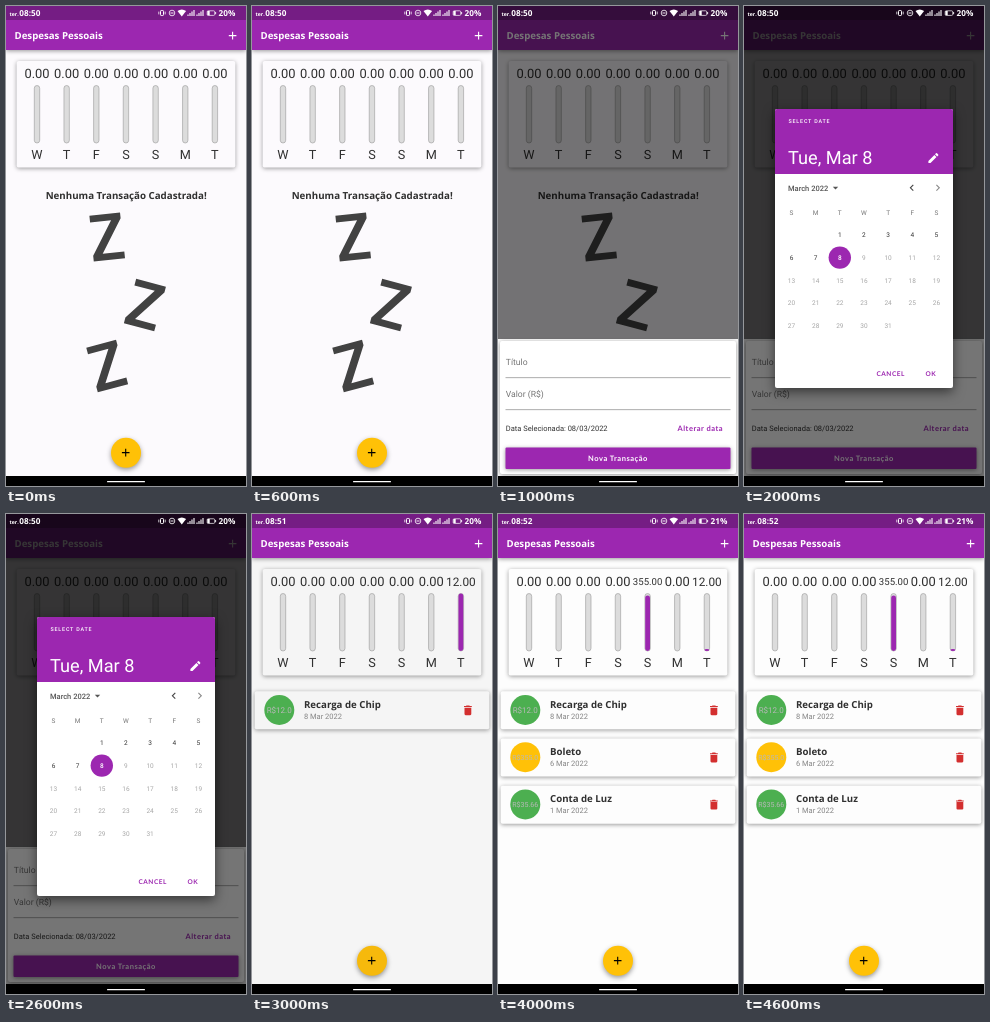
An HTML page that plays this animation: 240x480 px, repeating every 5000 ms.

```html
<!DOCTYPE html>
<html lang="pt">
<head>
<meta charset="utf-8">
<title>Despesas Pessoais</title>
<style>
html, body { margin: 0; width: 100%; height: 100%; overflow: hidden; background: #000; }
svg { display: block; width: 100%; height: 100%; text-rendering: geometricPrecision; }
text { font-family: Roboto, sans-serif; white-space: pre; }
.title { font: bold 9.66px "Open Sans", sans-serif; }
.status { font: bold 8.2px "Open Sans", sans-serif; }
.button { font: bold 7.5px Lato, sans-serif; letter-spacing: .52px; }
.raised { filter: drop-shadow(0 1.8px 2px #0006); }
.fab { filter: drop-shadow(0 2.5px 2.5px #0006); }
.dialog { filter: drop-shadow(0 4px 6px #0008); }
</style>
</head>
<body>
<svg id="stage" viewBox="0 0 240 480"></svg>
<script>
const PURPLE = '#9c27b0', GREEN = '#4caf50', AMBER = '#ffc107', INK = '#303030';
const stage = document.getElementById('stage');

const rect = (x, y, w, h, color, more = '') =>
  `<rect x="${x}" y="${y}" width="${w}" height="${h}" fill="${color}" ${more}/>`;
const circle = (x, y, r, color, more = '') =>
  `<circle cx="${x}" cy="${y}" r="${r}" fill="${color}" ${more}/>`;
const text = (x, y, str, color, size, more = '') =>
  `<text x="${x}" y="${y}" fill="${color}" ${size ? `font-size="${size}"` : ''} ${more}>${str}</text>`;
const centered = (x, y, str, color, size, more = '') =>
  text(x, y, str, color, size, 'text-anchor="middle" ' + more);
const fill = (d, color) => `<path d="${d}" fill="${color}"/>`;
const line = (d, color, width = 1) =>
  `<path d="${d}" fill="none" stroke="${color}" stroke-width="${width}"/>`;
const plus = (x, y, color) => line(`M${x - 3.8} ${y}h7.6M${x} ${y - 3.8}v7.6`, color, 1.1);
const scrim = () => rect(0, 0, 240, 470, '#000', 'opacity=".54"');

function statusBar({ time, battery }) {
  return text(3.5, 10, 'ter.', '#fff', 0, 'class="status" style="font-size:5.2px"') +
    text(13.3, 10, time, '#fff', 0, 'class="status"') +
    rect(154.5, 4.5, 3, 5, 'none', 'rx=".8" stroke="#fff"') +
    line('M152.8 5.6v2.8M159.2 5.6v2.8', '#fff', .8) +
    circle(166, 7, 2.8, 'none', 'stroke="#fff" stroke-width=".8"') +
    line('M164.4 7h3.2', '#fff', .9) +
    fill('M171.5 5q4.3-3.2 8.6 0l-4.3 5.4z', '#fff') +
    [182, 191].map(x => line(`M${x} 10v-1.6M${x + 2} 10v-3M${x + 4} 10v-4.4M${x + 6} 10v-6`, '#fff', 1.1)).join('') +
    rect(201.2, 4.8, 7.5, 4.6, 'none', 'rx="1" stroke="#fff" stroke-width=".7"') +
    rect(201.5, 5, 2.2, 4.2, '#fff') + rect(209.2, 6, .9, 2.2, '#fff') +
    text(212.6, 10, battery + '%', '#fff', 0, 'class="status"');
}

const navBar = () => rect(0, 470, 240, 10, '#000') + rect(101, 475, 38, 1.3, '#fff', 'rx=".6"');

const appBar = () =>
  `<g class="raised">${rect(0, 0, 240, 44, PURPLE)}</g>` +
  rect(0, 0, 240, 14, '#000', 'opacity=".25"') +
  text(8.5, 33, 'Despesas Pessoais', '#fff', 0, 'class="title"') + plus(226.6, 29.6, '#fff');

function chart(values, paper) {
  const total = values.reduce((a, b) => a + b) || 1;
  const bars = values.map((v, i) => {
    const x = 31 + i * 29.65, label = v.toFixed(2);
    const size = { 4: 12.9, 5: 11.8, 6: 9.6 }[label.length];
    const h = 57.5 * v / total;
    return centered(x, 67.5 + size * .35, label, INK, size) +
      rect(x - 2.7, 79.5, 5.4, 57.5, '#dcdcdc', 'rx="2.7" stroke="#999" stroke-width=".6"') +
      (v ? rect(x - 2.4, 137 - h, 4.8, h, PURPLE, 'rx="2.4"') : '') +
      centered(x, 153.4, 'WTFSSMT'[i], INK, 12.7);
  });
  return `<g class="raised">${rect(10.7, 55, 218.6, 106.5, paper, 'rx="2"')}</g>` + bars.join('');
}

const letterZ = (x, y, angle) =>
  `<path transform="translate(${x} ${y}) rotate(${angle})" fill="#424242"
    d="M-15.3-23H15.5V-17.2L-6 16.2H15.7V23H-15.7V17.2L5.8-16.2H-15.3Z"/>`;

const emptyList = () =>
  centered(120.2, 193, 'Nenhuma Transação Cadastrada!', INK, 0, 'class="title" style="font-size:9.75px"') +
  letterZ(101, 231, -6) + letterZ(139, 299, 15) + letterZ(101, 360, -15);

function item([name, date, amount, color], i, paper) {
  const label = 'R$' + amount, size = label.length > 6 ? 7 : 8;
  return `<g transform="translate(0 ${i * 47.2})">
    <g class="raised">${rect(2.7, 177.3, 234.6, 38, paper, 'rx="2"')}</g>` +
    circle(27.3, 196, 15, color) +
    centered(27.2, 196 + size * .36, label, '#b8b8b8', size) +
    text(52, 193.5, name, INK, 0, 'class="title"') +
    text(52, 204.7, date, '#858585', 7.5) +
    fill('M212 192h1.9l.6-.6h2.8l.6.6h1.9v1.1h-7.8zM212.5 193.7h6.8v6.4q0 1.1-1.1 1.1h-4.6q-1.1 0-1.1-1.1z', '#d32f2f') + '</g>';
}

const fab = color => `<g class="fab">${circle(120, 446.8, 15, color)}</g>` + plus(119.7, 446.6, '#000');

const field = (y, label) =>
  text(7.8, y, label, '#757575', 8.6) + rect(7.5, y + 12.4, 225, .7, '#8a8a8a');

const sheet = () =>
  rect(0, 333, 240, 137, '#fafafa') +
  `<g class="raised">${rect(2, 335, 236, 133, '#fff', 'rx="2"')}</g>` +
  field(359, 'Título') + field(391, 'Valor (R$)') +
  text(7.8, 425, 'Data Selecionada: 08/03/2022', '#333', 7.5) +
  text(179.5, 425, 'Alterar data', PURPLE, 0, 'class="button"') +
  `<g class="raised">${rect(7.5, 441.5, 225, 21.5, PURPLE, 'rx="1"')}</g>` +
  centered(120, 455, 'Nova Transação', '#fff', 0, 'class="button"');

function datePicker() {
  const column = i => 47.5 + i * 24.15;
  let days = '';
  for (let d = 1; d <= 31; d++) {
    const cell = d + 1, x = column(cell % 7), y = 229 + Math.floor(cell / 7) * 22.6;
    if (d === 8) days += circle(x, y, 11.2, PURPLE);
    days += centered(x, y + 2.3, d, d < 8 ? '#333' : d === 8 ? '#fff' : '#a6a6a6', 6.5,
      d === 8 ? 'font-weight="500"' : '');
  }
  return `<g class="dialog">${rect(31, 103, 178, 279, '#fff', 'rx="2"')}</g>` +
    fill('M31 168V105q0-2 2-2H207q2 0 2 2V168z', PURPLE) +
    text(44.5, 117, 'SELECT DATE', '#fff', 5.36, 'letter-spacing=".8" font-weight="500"') +
    text(44, 158, 'Tue, Mar 8', '#fff', 18.2) +
    fill('M184.4 154.9v2.1h2.1l6-6-2.1-2.1zM191 148.3l1-1q.5-.4 1 0l1.2 1.2q.4.5 0 1l-1 1z', '#fff') +
    text(44, 184.6, 'March 2022', '#555', 7.5, 'font-weight="500"') +
    fill('M88.8 180.7h5.4l-2.7 2.7z', '#555') +
    line('M169.3 178.9l-2.9 2.9 2.9 2.9', '#444', 1.1) +
    line('M192.4 178.9l2.9 2.9-2.9 2.9', '#888', 1.1) +
    [...'SMTWTFS'].map((c, i) => centered(column(i), 209, c, '#777', 6.5)).join('') + days +
    text(132.5, 370, 'CANCEL', PURPLE, 0, 'class="button" style="font-size:6.5px"') +
    text(181.5, 370, 'OK', PURPLE, 0, 'class="button" style="font-size:6.5px"');
}

const none = [0, 0, 0, 0, 0, 0, 0];
const recharge = ['Recarga de Chip', '8 Mar 2022', '12.0', GREEN];
const start = { time: '08:50', battery: 20, values: none, items: [], paper: '#fcfafd', accent: AMBER };
const scenes = [
  start,
  { ...start, sheet: true },
  { ...start, sheet: true, picker: true },
  { ...start, time: '08:51', values: [0, 0, 0, 0, 0, 0, 12], items: [recharge], paper: '#f5f5f5', accent: '#f6b90c' },
  { ...start, time: '08:52', battery: 21, values: [0, 0, 0, 0, 355, 0, 12], paper: '#fdfdfd', items: [
    recharge,
    ['Boleto', '6 Mar 2022', '355.0', AMBER],
    ['Conta de Luz', '1 Mar 2022', '35.66', GREEN]
  ] }
];

const draw = s =>
  rect(0, 0, 240, 480, s.paper) + appBar() + chart(s.values, s.paper) +
  (s.items.length ? s.items.map((it, i) => item(it, i, s.paper)).join('') : emptyList()) +
  fab(s.accent) +
  (s.sheet ? scrim() + sheet() : '') +
  (s.picker ? scrim() + datePicker() : '') +
  statusBar(s) + navBar();

let shown = -1;
function tick() {
  const now = Math.floor(performance.now() % 5000 / 1000);
  if (now !== shown) stage.innerHTML = draw(scenes[shown = now]);
  requestAnimationFrame(tick);
}
tick();
</script>
</body>
</html>
```
